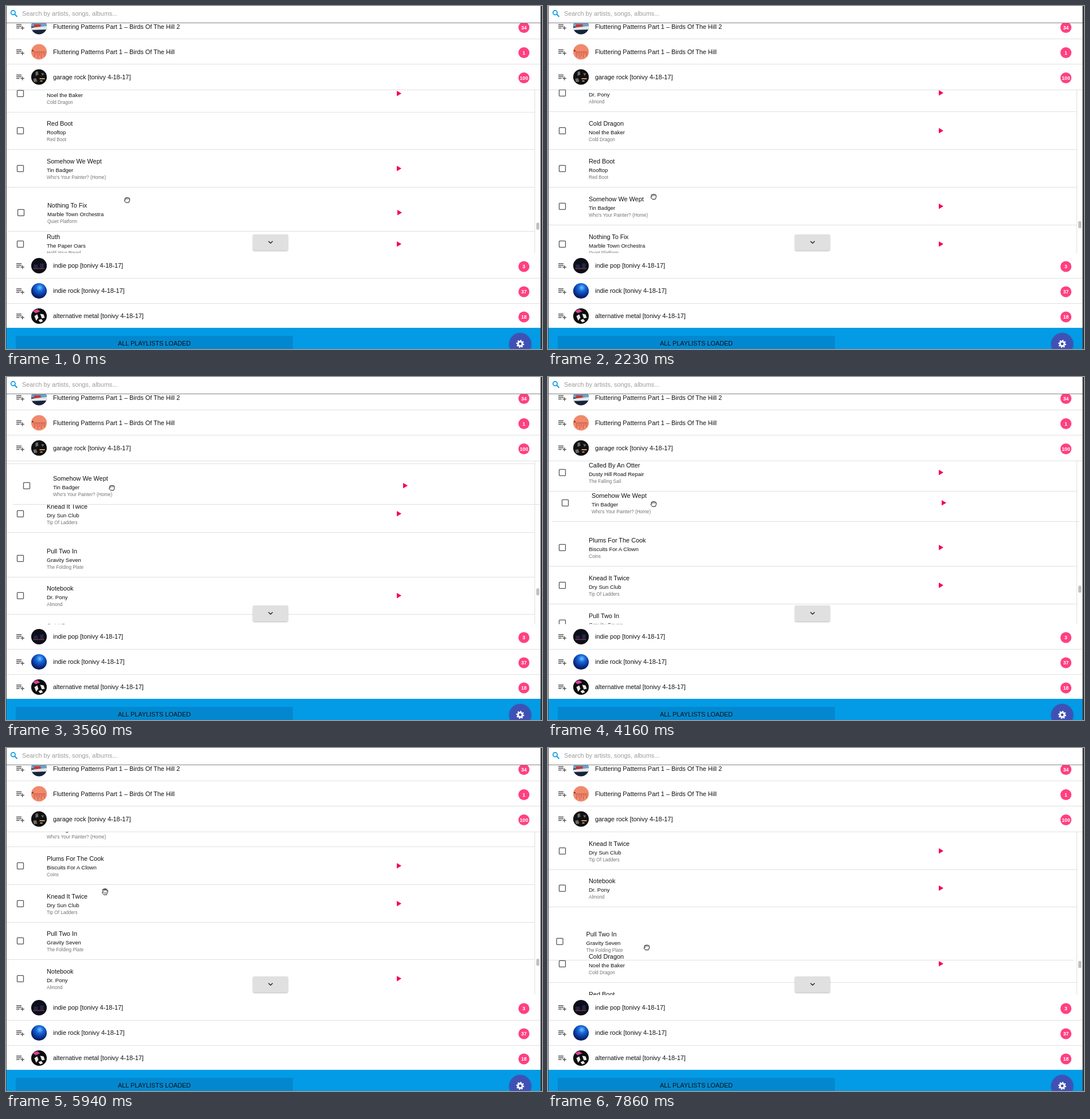
Animation of 934x599 px, one loop 8 s. Source, as an HTML page:

```html
<!DOCTYPE html>
<html lang="en">
<head>
<meta charset="utf-8">
<title>Playlists</title>
<style>
  html, body { margin: 0; width: 100%; height: 100%; overflow: hidden; background: #fff; }
  svg { display: block; width: 934px; height: 599px; font-family: "Liberation Sans", Arial, sans-serif; }
  .title { font-size: 10.88px; fill: #111; }
  .artist { font-size: 9.52px; fill: #111; }
  .album { font-size: 8.16px; fill: #757575; }
  .rule { fill: #e0e0e0; }
  .badge { font-size: 8.6px; font-weight: bold; fill: #fff; text-anchor: middle; }
  .icon { fill: none; stroke: #555; stroke-width: 1.3; }
</style>
</head>
<body>
<svg viewBox="0 0 934 599">
  <defs>
    <clipPath id="view"><rect x="1" y="146" width="930" height="285.5"/></clipPath>
    <clipPath id="disc"><circle r="13.6"/></clipPath>
    <radialGradient id="glow" cx=".55" cy=".3" r=".75">
      <stop offset="0" stop-color="#6fc3ff"/><stop offset=".3" stop-color="#1667d8"/>
      <stop offset=".7" stop-color="#0a2a86"/><stop offset="1" stop-color="#030b30"/>
    </radialGradient>
    <filter id="lift" x="-20%" y="-30%" width="140%" height="170%">
      <feDropShadow dx="0" dy="1" stdDeviation="1" flood-opacity=".38"/>
    </filter>
  </defs>

  <rect width="934" height="599" fill="#fff"/>
  <g id="lists"></g>
  <rect class="rule" x="921" y="146" width="1" height="285"/>
  <g id="songs" clip-path="url(#view)"></g>

  <rect x="430.5" y="399" width="60.5" height="27.5" rx="1.4" fill="#e0e0e0" filter="url(#lift)"/>
  <path d="M457.4 410.8l3.6 3.5 3.6-3.5" fill="none" stroke="#222" stroke-width="1.5"/>

  <rect width="934" height="29" fill="#fff"/>
  <rect y="29" width="932" height="1" fill="#858585"/>
  <g fill="none" stroke="#039be5" stroke-width="1.7">
    <circle cx="12.4" cy="11.6" r="3.7"/><path d="M15.2 14.4l4.2 4.3" stroke-width="2"/>
  </g>
  <text class="title" x="28" y="16.6" style="fill:#9b9b9b">Search by artists, songs, albums...</text>

  <rect y="562" width="934" height="37" fill="#039be5"/>
  <rect x="17" y="576" width="483" height="23" fill="#0388cf"/>
  <text class="title" x="258.5" y="593" text-anchor="middle">ALL PLAYLISTS LOADED</text>
  <circle cx="896" cy="590" r="19.2" fill="#3f51b5" filter="url(#lift)"/>
  <g transform="translate(896 590)" fill="none" stroke="#fff">
    <circle r="3.9" stroke-width="3"/>
    <circle r="5.8" stroke-width="2.2" pathLength="16" stroke-dasharray="1 1"/>
  </g>

  <rect width="1" height="599" fill="#4a4a4a"/>
  <rect x="931.5" width="2.5" height="599" fill="#333"/>
  <rect id="thumb" x="924" width="5.5" height="12.5" rx="2.7" fill="#c1c1c1"/>

  <g id="cursor" stroke="#111" stroke-linejoin="round" stroke-linecap="round">
    <path id="arrow" fill="#111" stroke="#fff" stroke-width=".8" d="M-3-5.5v10l2.3-2.1 1.6 3.7 1.7-.8-1.6-3.5h3.2z"/>
    <g id="fist" fill="#fff">
      <path d="M-4-2q0-2.3 2-1.8 1-1.2 2.2-.3 1.2-.8 2.1.3 2.2-.3 2.2 1.8V.6L3 4.2h-5.2L-4.6 1.4q-.7-1.4.6-1.6z"/>
      <path fill="none" stroke-width=".7" d="M-1.9-3.5v2M.2-3.9v2.3M2.3-3.5v2M-4-.2h1.4"/>
    </g>
    <g id="hand" fill="#fff" stroke-width=".9">
      <path d="M-3.3 0l-1-3.2q.2-1.4 1.5-.6l.8 1.6-.5-2.6q.8-1.3 1.6 0l.5 2.3v-2.6q.9-1.2 1.7 0l.1 2.6.7-2.1q1.1-.8 1.6.4L3.2-.8l.7-1.2q1.3-.4 1.3.8L4 2.6 2.8 5.4h-4.9L-5 1.3q-.3-1.7 1.7-.2z"/>
      <path fill="none" stroke-width=".6" d="M-.9 1.3v2M.7 1.3v2M2.2 1.3v2"/>
    </g>
  </g>
</svg>

<script>
const $ = id => document.getElementById(id);
const LOOP = 8000, ROW = 65.85;

// Cover art, drawn around 0,0
const covers = [
  '<rect x="-14" y="-14" width="28" height="28" fill="#16243a"/><path d="M-14-8H14V0H-14z" fill="#6f9fc8"/><path d="M-9-4H3V2H-9z" fill="#c03a3a"/><path d="M-14 2L14-1V5L-14 6z" fill="#e4e8ec"/>',
  '<rect x="-14" y="-14" width="28" height="28" fill="#f08a6c"/><path d="M-10 0H11M-8 0V9M-5 0V6M-2 0V11M1 0V7M4 0V10M7 0V5M10 0V8" stroke="#c9584a" stroke-width="1"/><circle cx="-11" cy="-2" r="1.6" fill="#8f3a38"/>',
  '<rect x="-14" y="-14" width="28" height="28" fill="#111"/><path d="M-6-9l4-1 1 6-5 2zM4-7l5 1-3 4zM-10 3l5-1 2 6-6 1z" fill="#6d6a68"/><path d="M1 2h9v2H1zM2 6h4v2H2z" fill="#c79a6c"/>',
  '<rect x="-14" y="-14" width="28" height="28" fill="#0d0e17"/><path d="M-9-2h7v6h-7zM2-4h6v8H2z" fill="#20264a"/><path d="M-10 5H9" stroke="#7c3540" stroke-width="1.4"/>',
  '<rect x="-14" y="-14" width="28" height="28" fill="url(#glow)"/>',
  '<rect x="-14" y="-14" width="28" height="28" fill="#0c0c0c"/><path d="M-11-9l8-3 5 4-8 3z" fill="#d6409a"/><path d="M-8 0l5-3 2 6-4 5zM2-4l6 1 2 6-5 1zM-1 7l5-2 3 4-5 2z" fill="#e8e8e8"/>'
];

const lists = [
  [35.5, 'Fluttering Patterns Part 1 – Birds Of The Hill 2', 34],
  [79.5, 'Fluttering Patterns Part 1 – Birds Of The Hill', 1],
  [123.5, 'garage rock [tonivy 4-18-17]', 100],
  [453, 'indie pop [tonivy 4-18-17]', 3],
  [497, 'indie rock [tonivy 4-18-17]', 37],
  [541, 'alternative metal [tonivy 4-18-17]', 18]
];
$('lists').innerHTML = lists.map(([y, name, count], i) => `
  <path class="icon" d="M18 ${y - 3}h9M18 ${y}h9M18 ${y + 3}h5.6M25.4 ${y + 3}h6.4M28.6 ${y - .2}v6.4"/>
  <g transform="translate(57.5 ${y + .5})" clip-path="url(#disc)">${covers[i]}</g>
  <text class="title" x="82" y="${y + 4}">${name}</text>
  <circle cx="902.5" cy="${y + 2}" r="9.6" fill="#ff4081"/>
  <text class="badge" x="902.5" y="${y + 5}">${count}</text>
  ${i < 5 && i !== 2 ? `<rect class="rule" x="1" y="${Math.floor(y + 22)}" width="930" height="1"/>` : ''}`).join('')
  + '<rect class="rule" x="1" y="146" width="930" height="1"/>';

const songs = [
  ['Called By An Otter', 'Dusty Hill Road Repair', 'The Falling Sail', 1],
  ['Plums For The Cook', 'Biscuits For A Clown', 'Coins', 1],
  ['Knead It Twice', 'Dry Sun Club', 'Tip Of Ladders', 1],
  ['Pull Two In', 'Gravity Seven', 'The Folding Plate', 0],
  ['Notebook', 'Dr. Pony', 'Almond', 1],
  ['Cold Dragon', 'Noel the Baker', 'Cold Dragon', 1],
  ['Red Boot', 'Rooftop', 'Red Boot', 0],
  ['Somehow We Wept', 'Tin Badger', "Who's Your Painter? (Home)", 1],
  ['Nothing To Fix', 'Marble Town Orchestra', 'Quiet Platform', 1],
  ['Ruth', 'The Paper Oars', 'Hold Your Bread', 1]
];
$('songs').innerHTML = songs.map(([title, artist, album, play]) => `<g>
  <rect class="rule" x="1" y="66" width="920" height="1"/>
  <rect x="19.5" y="28.3" width="11" height="11" rx="1" class="icon"/>
  <text class="title" x="71" y="25">${title}</text>
  <text class="artist" x="71" y="40">${artist}</text>
  <text class="album" x="71" y="51.6">${album}</text>
  ${play ? '<path d="M681 29v9.6l8-4.8z" fill="#f50057"/>' : ''}</g>`).join('');
const rows = [...$('songs').children];

const ticks = [0];
[[140, 1180, 8], [1330, 1780, 4], [2080, 3120, 8], [3270, 4310, 8],
 [4600, 5500, 7], [5790, 6090, 3], [6390, 6540, 2], [6840, 7860, 8]].forEach(([a, b, n]) => {
  for (let i = 0; i < n; i++) ticks.push(Math.floor((a + (b - a) * i / (n - 1)) / 10) * 10);
});

// Tracks: [time, value, value...]
const scroll = [[0, -210.65], [440, -210.65], [1180, -144.95], [2830, -144.95], [2970, -115.9],
  [3560, 19.2], [4060, 132.5], [5500, 132.5], [5790, 95], [6090, -15], [6390, -40], [6540, -52]];
const nudge = [[0, 1, 10.5], [140, 1, 10.5], [440, 0, 0]];
const dragUp = [[2230, 0, 316], [2370, 5, 290], [2820, 11.7, 172], [2970, 11.7, 159.5],
  [3560, 11, 155.5], [3900, 11, 155.5], [4160, 5, 186], [4310, 0, 198.35]];
const dragDown = [[6840, 0, 211.4], [7000, -.5, 215], [7700, -4, 296], [7860, -4.5, 304]];
const pointer = [[0, 211, 339], [440, 200, 352], [1180, 162, 388], [1330, 161, 387], [1780, 174, 362],
  [2080, 183, 336], [2230, 184, 333], [2820, 184.5, 207], [2970, 184.5, 195], [3900, 184.5, 193],
  [4160, 184, 222], [4310, 184, 230], [4600, 183, 234], [5050, 178, 250.5], [5250, 174, 272],
  [5500, 172.5, 251], [6840, 172.5, 251], [7000, 172.5, 255], [7700, 172, 340], [7860, 172, 348.5]];
const makeRoom = [0, 3705, 3410, 3115, 2820, 2640, 2460];

function at(track, t) {
  const n = track.findIndex(k => k[0] > t);
  if (n === 0) return track[0].slice(1);
  if (n < 0) return track[track.length - 1].slice(1);
  const a = track[n - 1], b = track[n], p = (t - a[0]) / (b[0] - a[0]);
  return a.slice(1).map((v, i) => v + (b[i + 1] - v) * p);
}
const settle = (t, start) => 1 - Math.pow(1 - Math.min(1, Math.max(0, (t - start) / 300)), 2.5);

function place(i, t, top) {
  let x = 0, y = top + i * ROW;
  if (i > 0 && i < 7) y += ROW * settle(t, makeRoom[i]);
  if (i === 7 && t > 2230) [x, y] = t < 4310 ? at(dragUp, t) : [0, top + ROW];
  if (i === 8) { const [dx, dy] = at(nudge, t); x += dx; y += dy; }
  if (i === 3 && t >= 6840) [x, y] = at(dragDown, t);
  if (i === 4) y -= ROW * settle(t, 7270);
  return [x, Math.round(y)];
}

function cursorKind(t) {
  if (t < 300 || (t >= 2200 && t < 4600) || t >= 6840) return 'fist';
  return t >= 4600 && t < 5240 ? 'arrow' : 'hand';
}

function draw(now) {
  const time = now % LOOP;
  const t = ticks.filter(k => k <= time).pop();
  const [top] = at(scroll, t);
  rows.forEach((row, i) => row.setAttribute('transform', `translate(${place(i, t, top)})`));
  $('thumb').setAttribute('y', 378.3 - .0408 * (top + 210.65));
  $('cursor').setAttribute('transform', `translate(${at(pointer, t)})`);
  const kind = cursorKind(t);
  for (const id of ['arrow', 'fist', 'hand']) $(id).style.display = id === kind ? '' : 'none';
}

const start = performance.now();
function loop() {
  draw(performance.now() - start);
  requestAnimationFrame(loop);
}
loop();
</script>
</body>
</html>
```
